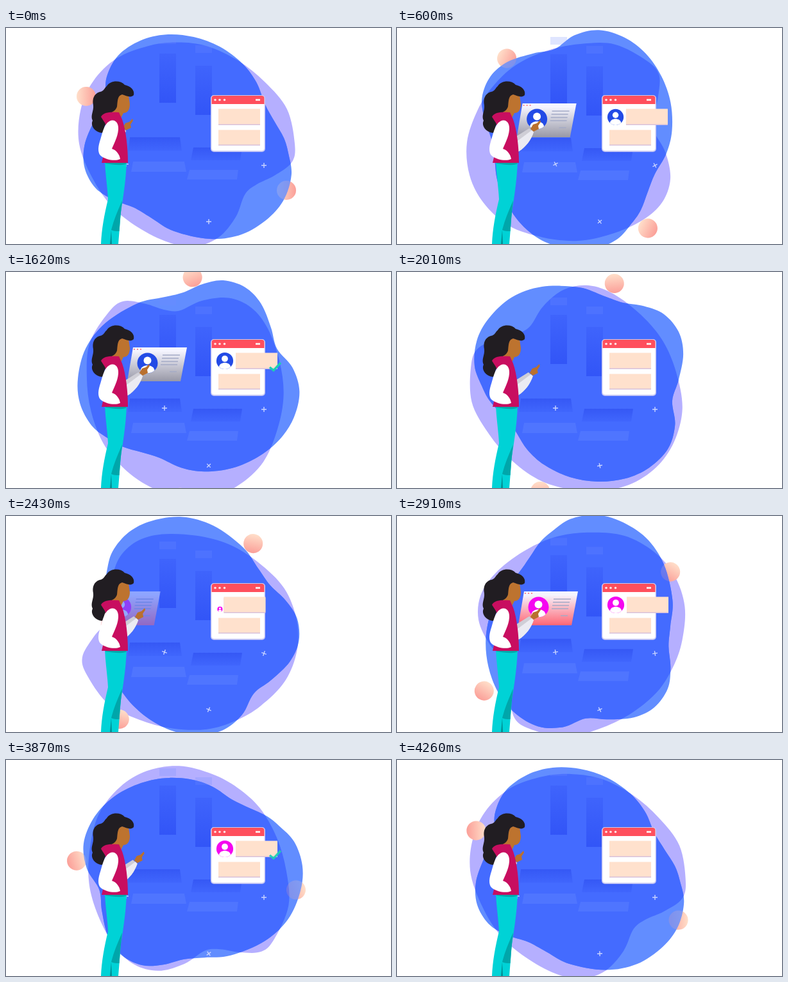
Animation, 600 px wide and 338 px high, one loop 4290 ms. Source, as an HTML page:

```html
<!DOCTYPE html>
<html lang="en">
<head>
<meta charset="utf-8">
<title>Sorting profiles</title>
<style>
  html, body { margin: 0; width: 100%; height: 100%; overflow: hidden; background: #fff; }
  svg { display: block; width: 100vw; height: 100vh; }
</style>
</head>
<body>
<svg viewBox="0 0 600 338">
  <defs>
    <clipPath id="overlap"><path class="lilac"/></clipPath>
    <linearGradient id="peach">
      <stop offset="0" stop-color="#ffdfca"/><stop offset="1" stop-color="#fb9f98"/>
    </linearGradient>
    <linearGradient id="cardFill" x1="0" y1="0" x2="0" y2="1">
      <stop offset="0.1" stop-color="#f5f5ff"/><stop id="cardEnd" offset="1" stop-color="#9898a6"/>
    </linearGradient>
    <linearGradient id="column" x1="0" y1="0" x2="0" y2="1">
      <stop offset="0" stop-color="#3f64fc"/><stop offset="1" stop-color="#3255f7"/>
    </linearGradient>
    <linearGradient id="bar" x1="0" y1="0" x2="0" y2="1">
      <stop offset="0" stop-color="#3558f5"/><stop offset="1" stop-color="#4066fd"/>
    </linearGradient>
    <g id="balls" fill="url(#peach)">
      <circle cx="-156" cy="-73.5" r="15"/><circle cx="156" cy="73.5" r="15"/>
    </g>
    <g id="person">
      <circle r="16"/>
      <g fill="#fff"><circle cy="-4" r="6"/><path d="M-11 11.5C-10 1 10 1 11 11.5A16 16 0 0 1 -11 11.5Z"/></g>
    </g>
    <path id="plus" d="M-4 0H4M0 -4V4" stroke="#c9d4ff" stroke-width="1.4"/>
  </defs>

  <path class="lilac" fill="#b5afff"/>
  <use href="#balls" class="orbit"/>
  <path class="azure" fill="#628dff"/>
  <g clip-path="url(#overlap)"><path class="azure" fill="#446bff"/></g>
  <use href="#balls" class="orbit" opacity="0.2"/>

  <g id="scenery">
    <path fill="url(#column)" d="M239 40H265V117H239Z"/>
    <path fill="url(#column)" d="M295 59H321V136H295Z"/>
    <path fill="#7089ff" opacity="0.22" d="M239 13H265V25H239ZM295 27H321V39H295Z"/>
    <path fill="url(#bar)" d="M193 171H271L274 192H190Z"/>
    <path fill="url(#bar)" d="M292 187H368L365 207H288Z"/>
    <path fill="#4f75ff" d="M198 209H278L281 225H195ZM286 222H362L360 237H282Z"/>
  </g>
  <use href="#plus" id="plusRight"/>
  <use href="#plus" id="plusLow"/>
  <use href="#plus" id="plusLeft"/>

  <g id="card">
    <path fill="url(#cardFill)" d="M198 118H282L272 171H189Z"/>
    <path fill="none" stroke="#ff6570" stroke-width="1.6" stroke-dasharray="2 3" d="M199 121H213"/>
    <use href="#person" class="face" transform="translate(220.5 142.5)"/>
    <path fill="none" stroke="#a4abc6" stroke-width="1.7" d="M244 130H271M243 135H269M242 140H268M241 145H267M255 156H266"/>
  </g>

  <rect x="319" y="105" width="85" height="89" rx="5" fill="#c8c9f5"/>
  <rect x="320.5" y="106" width="82" height="86" rx="4" fill="#fff"/>
  <path fill="#ff4f5d" d="M320.5 119V110Q320.5 106 324.5 106H398.5Q402.5 106 402.5 110V119Z"/>
  <g fill="#ffe3e3"><circle cx="326" cy="112.5" r="1.8"/><circle cx="333" cy="112.5" r="1.8"/><circle cx="340.5" cy="112.5" r="1.8"/><rect x="389" y="111" width="7" height="3"/></g>
  <use href="#person" id="avatar" class="face"/>
  <g id="topBox"><rect x="331" y="128" width="65" height="24" fill="#d8c2dc"/><rect x="331" y="126.5" width="65" height="24" fill="#ffe1cd"/></g>
  <rect x="331" y="160" width="65" height="24" fill="#d8c2dc"/><rect x="331" y="159.5" width="65" height="23" fill="#ffe1cd"/>
  <path id="check" fill="none" stroke="#1bcfb4" stroke-width="3.4" pathLength="1" stroke-dasharray="1 1" d="M411 149L417 154L428 142"/>

  <g id="arm">
    <path fill="#cfced6" d="M182 172L206 157L213 163C209 175 201 186 190 193L182 194Z"/>
    <path fill="#ebebf2" d="M186 178L210 160L213 163C209 175 201 186 190 193L183 194Z"/>
    <path fill="#b9702e" d="M208 158L212 151L218 149L223 144L224 147L220 153L221 158L213 162Z"/>
  </g>
  <path fill="#00d2d6" d="M154 209H188C187 236 183 263 179 288L175 338H148C149 315 153 293 159 268C158 248 155 230 154 209Z"/>
  <path fill="#00a6aa" d="M181 270L178 298L176.500 318C172 318 168 318 164 316C168 300 174 286 181 270ZM155 210H188L187 213C176 216 165 213 155 212Z"/>
  <path fill="#008e94" d="M162 338L164 316L165 338Z"/>
  <path fill="#bd732f" d="M170 103L191 105L193 119C193 127 190 133 183 133L179 141L162 138Z"/>
  <path fill="#211d22" d="M157 91C162 82 178 81 185 89C194 91 201 97 199 105C195 110 187 106 181 104C174 106 174 112 173 123C169 134 160 131 153 140L155 151C151 157 155 164 149 164C139 163 131 153 135 145C131 137 137 130 136 121C134 111 137 103 146 100C153 99 153 94 157 91Z"/>
  <path fill="#c80e60" d="M148 139C153 130 166 132 176 132L181 143C187 160 190 187 190 211H149L153 194L155 150Z"/>
  <path fill="#fff" d="M161 146C170 141 176 149 175 159C174 171 168 181 165 189C172 191 177 198 178 205C170 209 156 206 149 201C143 197 143 188 146 178C150 166 152 151 161 146Z"/>
</svg>
<script>
const LOOP = 4290, HALF = LOOP / 2, STEP = 30;
const all = s => document.querySelectorAll(s);
const byId = id => document.getElementById(id);
const place = (el, x, y, angle = 0, size = 1) =>
  el.setAttribute('transform', `translate(${x} ${y}) rotate(${angle}) scale(${size})`);
const progress = (t, a, b) => Math.min(1, Math.max(0, (t - a) / (b - a)));
const smooth = (t, a, b) => { const p = progress(t, a, b); return p * p * (3 - 2 * p); };
const easeOut = (t, a, b) => 1 - (1 - progress(t, a, b)) ** 2;

// Closed smooth curve through "angle:radius" pairs
function blob(spec) {
  const pts = spec.split(' ').map(pair => {
    const [deg, r] = pair.split(':').map(Number), a = deg * Math.PI / 180;
    return [r * Math.cos(a), r * Math.sin(a)];
  });
  const at = i => pts[(i + pts.length) % pts.length];
  const ctrl = (p, from, to, k) => p.map((v, j) => (v + k * (to[j] - from[j]) / 6).toFixed(2));
  return `M${at(0)}` + pts.map((p, i) => {
    const next = at(i + 1);
    return `C${ctrl(p, at(i - 1), next, 1)} ${ctrl(next, p, at(i + 2), -1)} ${next}`;
  }).join('') + 'Z';
}

const shapes = {
  lilac: '0:169 10:167 20:146 30:127 41:121 56:138 71:155 85:161 100:157 120:151 140:152 160:156 180:167 198:173 214:175 231:172 249:164 265:159 282:156 302:153 322:156 341:166',
  azure: '0:146 9:155 20:168 33:175 46:175 62:171 79:161 100:148 116:139 129:140 141:154 152:167 164:171 176:165 190:152 203:145 216:161 229:171 243:171 257:166 272:158 288:150 305:142 320:135 336:128 349:134'
};
for (const name in shapes) all('.' + name).forEach(p => p.setAttribute('d', blob(shapes[name])));

function draw(t) {
  const turn = 360 * t / LOOP;
  all('.lilac').forEach(p => place(p, 281, 181, -turn));
  all('.azure').forEach(p => place(p, 287, 172, turn));
  all('.orbit').forEach(p => place(p, 281, 180.5, turn / 2));

  const sink = 27 * smooth(t, 500, 1350) * (1 - smooth(t, 2600, 3650));
  place(byId('scenery'), 0, sink);

  // Two profiles per loop: the first blue, the second magenta
  const second = t >= HALF, c = t % HALF;
  all('.face').forEach(p => p.setAttribute('fill', second ? '#f507f0' : '#234be6'));
  byId('cardEnd').setAttribute('stop-color', second ? '#ff6674' : '#9898a6');

  const spin = 90 * smooth(c, 0, 950);
  const slide = 60 * (easeOut(t, 150, 600) - smooth(t, 3250, 3440));
  place(byId('plusRight'), 402, 215, spin);
  place(byId('plusLow'), 316, 303, turn);
  place(byId('plusLeft'), 187 + slide, 213, spin);

  const enter = easeOut(c, 200, 700), out = enter * (1 - smooth(c, 1750, 2000));
  place(byId('topBox'), 27 * out, 0);
  place(byId('avatar'), 330 + 11 * out, 149 - 10 * out, 0, 0.82 * out);

  const leave = second ? smooth(t, 3380, 3720) : smooth(t, 1750, 2000);
  const shown = enter * (1 - leave);
  place(byId('card'), -60 * (1 - shown), 0);
  byId('card').setAttribute('opacity', Math.min(1, shown * 1.35));

  const check = byId('check');
  check.setAttribute('stroke-dashoffset', 1 - progress(c, 1400, 1560));
  check.setAttribute('opacity', c < 1400 ? 0 : 1 - smooth(c, 1700, 1850));

  const reach = smooth(t, 120, 560) * (1 - smooth(t, 3700, 4150));
  const dip = 12 * smooth(t, 1950, 2250) * (1 - smooth(t, 2250, 2650));
  place(byId('arm'), -26 * (1 - reach) - dip, -2 * (1 - reach));
}

const start = performance.now();
function tick() {
  const t = (performance.now() - start) % LOOP;
  draw(Math.floor(t / STEP) * STEP);
  requestAnimationFrame(tick);
}
tick();
</script>
</body>
</html>
```
